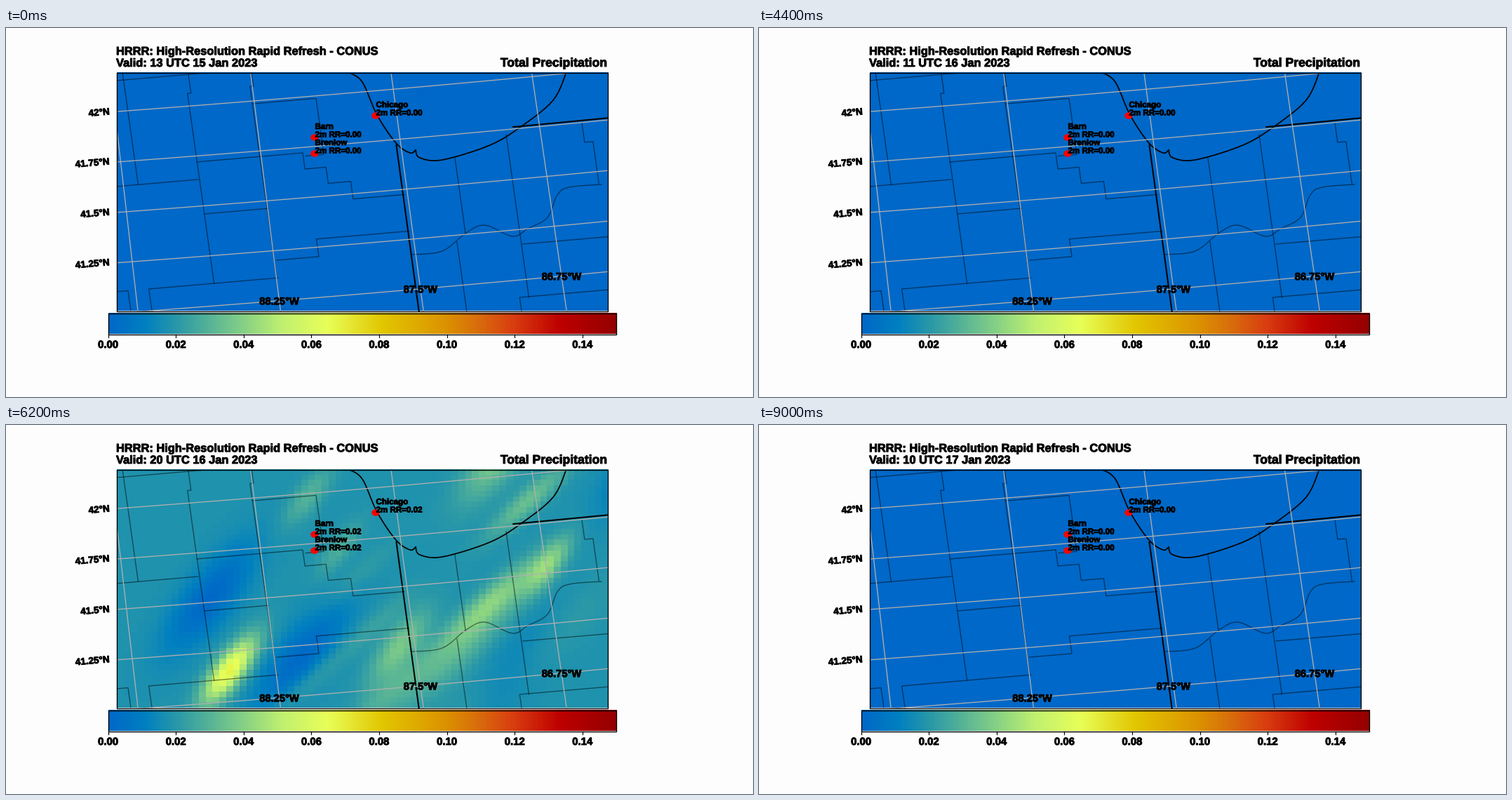
Recreate the animation shown at these times as a matplotlib script. Size 1065 px wide and 526 px high, loop 9200 ms.

```python
import matplotlib.pyplot as plt
import numpy as np
from matplotlib import patheffects
from matplotlib.animation import FuncAnimation
from matplotlib.colors import LinearSegmentedColormap
from matplotlib.patches import Ellipse, Rectangle

W, H, DPI = 1065, 526, 64
PT = 72 / DPI  # points per pixel
FRAMES, INTERVAL = 46, 200
LEFT, TOP, RIGHT, BOTTOM = 157.5, 63.5, 858, 403.5
COLS, ROWS = 72, 44
VMAX = 0.15

plt.rcParams["font.family"] = "Liberation Sans"
fig = plt.figure(figsize=(W / DPI, H / DPI), dpi=DPI, facecolor="#fdfdfd")
ax = fig.add_axes([0, 0, 1, 1])
ax.set_axis_off()

rain_cmap = LinearSegmentedColormap.from_list("rain", [
    (0.00, "#0068c8"), (0.07, "#0080c0"), (0.133, "#2a98a8"),
    (0.267, "#88d284"), (0.34, "#c0f070"), (0.43, "#e8ff58"),
    (0.54, "#e2c600"), (0.66, "#dc9400"), (0.73, "#d86c0c"),
    (0.80, "#d83c10"), (0.89, "#be0000"), (1.00, "#960000")])


# Map projection: Lambert conformal conic on one standard parallel.
STANDARD_LAT, CENTRAL_LON = 38.5, -97.5
SCALE_X, SCALE_Y = 20465, 16379  # pixels per radian
ANCHOR_GEO, ANCHOR_PIXEL = (-87.5, 41.5), (571.5, 229.6)


def lambert(lon, lat):
    phi0, lat = np.radians(STANDARD_LAT), np.radians(lat)
    n = np.sin(phi0)
    ratio = np.tan(np.pi / 4 + phi0 / 2) / np.tan(np.pi / 4 + lat / 2)
    rho = ratio ** n / np.tan(phi0)
    theta = n * np.radians(lon - CENTRAL_LON)
    return rho * np.sin(theta), rho * np.cos(theta)


def project(lon, lat):
    x, y = lambert(lon, lat)
    x0, y0 = lambert(*ANCHOR_GEO)
    return (ANCHOR_PIXEL[0] + SCALE_X * (x - x0),
            ANCHOR_PIXEL[1] + SCALE_Y * (y - y0))


def survey(x, y, *moves):
    """Border along the land grid: moves go south and east by turns."""
    points = [(x, y)]
    for i, d in enumerate(moves):
        x, y = (x + d, y - .086 * d) if i % 2 else (x + .14 * d, y + d)
        points.append((x, y))
    return points


def smooth(points, steps=8):
    """Catmull-Rom curve through a few points."""
    p = np.array([points[0], *points, points[-1]], float)
    t = np.linspace(0, 1, steps)[:, None]
    return np.vstack([
        b + .5 * t * (c - a + t * (2 * a - 5 * b + 4 * c - d
                                   + t * (3 * (b - c) + d - a)))
        for a, b, c, d in zip(p, p[1:], p[2:], p[3:])])


frame_box = Rectangle((LEFT, TOP), RIGHT - LEFT, BOTTOM - TOP, fill=False,
                      ec="black", lw=1.4 * PT, zorder=6)
ax.add_patch(frame_box)


def line(points, width, color="black", alpha=1, zorder=3):
    artist, = ax.plot(*np.transpose(points), color=color, lw=width * PT,
                      alpha=alpha, zorder=zorder)
    artist.set_clip_path(frame_box)


def label(x, y, text, size, ha="left", va="baseline", **kw):
    heavy = patheffects.withStroke(linewidth=.9 * PT, foreground="black")
    return ax.text(x, y, text, fontsize=size * PT, weight="bold", ha=ha,
                   va=va, zorder=8, path_effects=[heavy], **kw)


counties = [
    survey(166, 63, 160),
    survey(157, 75, 0, 190),
    survey(157, 226, 0, 117),
    survey(260, 66, 27, -5, 271),
    survey(272, 191, 0, 151, 23, 30, 23, 32, 25, 73),
    survey(283, 265, 0, 91),
    survey(208, 403, -31, 184),
    survey(157, 376, 0, 17, 28),
    survey(350, 63, 20, -5, 270),
    survey(352, 108, 0, 90, 80, -26),
    survey(386, 331, 0, 60, -25, 132),
    survey(640, 185, 109),
    survey(643, 305, 98),
    survey(713, 152, 232),
    survey(737, 308, 0, 121),
    survey(735, 403, -19, 126),
    survey(821, 135, 28, 12, 60),
]
river = smooth([(578, 323), (622, 318), (656, 292), (683, 281), (722, 297),
                (744, 286), (772, 270), (786, 238), (803, 227), (849, 223)])
shore_west = smooth([(488, 63), (508, 77), (529, 124), (556, 164),
                     (576, 178), (584, 174)])
shore_east = smooth([(584, 174), (590, 185), (622, 188), (690, 167),
                     (735, 140), (780, 103), (799, 63)])

for border in [*counties, river]:
    line(border, 1.3, alpha=.5)
for shore in (shore_west, shore_east):
    line(shore, 1.7)

lats, lons = np.linspace(40.8, 42.5, 60), np.linspace(-89.5, -86, 60)
line(np.transpose(project(-87.524, lats[lats < 41.74])), 2)
line(np.transpose(project(lons[lons > -86.9], 41.76)), 2)

for lon in np.arange(-89, -86.5, .75):
    line(np.transpose(project(lon, lats)), 1.3, "#b0b0b0", zorder=4)
    if lon > -89:
        label(*project(lon, 41), f"{-lon:g}°W", 14.7, "center",
              "center_baseline")
for lat in np.arange(41, 42.3, .25):
    xs, ys = project(lons, lat)
    line(np.column_stack([xs, ys]), 1.3, "#b0b0b0", zorder=4)
    if 41 < lat < 42.25:
        label(148.5, np.interp(LEFT, xs, ys) + 1.5, f"{lat:g}°N", 13.5,
              "right", "center", rotation=5)

label(157, 38.2, "HRRR: High-Resolution Rapid Refresh - CONUS", 16.4)
label(858, 55, "Total Precipitation", 17.6, "right")
valid_text = label(157, 55, "", 16.4)

# Colour scale
BAR_LEFT, BAR_RIGHT, BAR_TOP, BAR_BOTTOM = 145.5, 870, 407, 436.5
ax.imshow(np.linspace(0, 1, 256)[None], cmap=rain_cmap, aspect="auto",
          extent=(BAR_LEFT, BAR_RIGHT, BAR_BOTTOM, BAR_TOP), zorder=1)
ax.add_patch(Rectangle((BAR_LEFT, BAR_TOP), BAR_RIGHT - BAR_LEFT,
                       BAR_BOTTOM - BAR_TOP, fill=False, ec="black",
                       lw=1.4 * PT, zorder=6))
for value in np.arange(0, VMAX, .02):
    x = BAR_LEFT + (BAR_RIGHT - BAR_LEFT) * value / VMAX
    ax.plot([x, x], [BAR_BOTTOM, BAR_BOTTOM + 4.5], color="black", lw=1.2 * PT)
    label(x, 456, f"{value:.2f}", 14.9, "center")


# Rain: each stage is a level background plus streaks of one tilt and shape.
cell_w, cell_h = (RIGHT - LEFT) / COLS, (BOTTOM - TOP) / ROWS
gx, gy = np.meshgrid(LEFT + cell_w * (np.arange(COLS) + .5),
                     TOP + cell_h * (np.arange(ROWS) + .5))


class Stage:
    def __init__(self, hour, base, tilt, aspect, drift, streaks):
        self.hour, self.base, self.aspect, self.drift = hour, base, aspect, drift
        self.cos, self.sin = np.cos(np.radians(tilt)), np.sin(np.radians(tilt))
        self.streaks = streaks  # x, y, half length, strength

    def at(self, hour):
        field = np.full_like(gx, self.base)
        hours = hour - self.hour
        for x, y, length, strength in self.streaks:
            dx = gx - x - self.drift[0] * hours
            dy = gy - y - self.drift[1] * hours
            along = (dx * self.cos - dy * self.sin) / length
            across = (dx * self.sin + dy * self.cos) / (length * self.aspect)
            field += strength * np.exp(-along ** 2 - across ** 2)
        return field


stages = [
    Stage(25, .060, 86, .38, (45, -8), [
        (303, 205, 68, .045), (215, 252, 75, .024), (158, 335, 80, .036),
        (200, 64, 26, .050), (190, 125, 70, -.032), (240, 110, 50, -.016)]),
    Stage(29, .027, 52, .36, (40, -14), [
        (625, 68, 80, .032), (350, 130, 50, .018), (395, 205, 45, .015),
        (690, 230, 48, .034), (238, 378, 55, .078), (480, 345, 62, .030),
        (210, 275, 90, -.027), (340, 360, 95, -.026),
        (640, 375, 100, -.017), (820, 85, 80, -.017)]),
    Stage(34, .001, 42, .22, (38, -10), [
        (805, 222, 88, .055), (858, 78, 75, .045), (755, 295, 125, .035),
        (655, 355, 90, .022), (835, 320, 150, .022), (640, 255, 70, .016),
        (540, 340, 75, .022), (610, 190, 75, .013)]),
    Stage(38, .001, 54, .24, (38, -16), [
        (325, 102, 86, .140), (240, 75, 42, .068), (395, 95, 85, .026),
        (350, 225, 85, .058), (382, 328, 48, .135), (412, 356, 32, .080),
        (420, 256, 45, .072), (490, 252, 100, .028), (505, 312, 50, .022),
        (562, 155, 65, .020)]),
]
FADE_HOURS = 6


def sigmoid(z):
    return 1 / (1 + np.exp(-np.clip(z, -50, 50)))


def rain(hour):
    first, second, last = stages[0], stages[1], stages[-1]
    if hour <= first.hour:
        field = first.at(hour)
    elif hour >= last.hour:
        field = last.at(hour) * max(0, 1 - (hour - last.hour) / FADE_HOURS)
    else:
        a, b = next((a, b) for a, b in zip(stages, stages[1:])
                    if hour <= b.hour)
        t = (hour - a.hour) / (b.hour - a.hour)
        t = t * t * (3 - 2 * t)
        field = (1 - t) * a.at(hour) + t * b.at(hour)
    if hour < second.hour:
        # The leading edge sweeps east, with a weak fringe ahead of it.
        edge = 341 + .05 * (gy - 230) + 160 * (hour - first.hour)
        field *= (.85 * sigmoid((edge - gx) / 10)
                  + .15 * sigmoid((edge + 40 - gx) / 20))
    return np.clip(field, 0, VMAX)


image = ax.imshow(np.zeros((ROWS, COLS)), cmap=rain_cmap, vmin=0, vmax=VMAX,
                  extent=(LEFT, RIGHT, BOTTOM, TOP), interpolation="nearest",
                  aspect="auto", zorder=1)

readings = []
for x, y, name in [(527, 125, "Chicago"), (440, 156, "Barn"),
                   (440, 179, "Brenlow")]:
    ax.add_patch(Ellipse((x, y), 11.5, 9.5, color="red", lw=0, zorder=7))
    label(x + .5, y - 12, name, 11.6)
    row, col = int((y - TOP) / cell_h), int((x - LEFT) / cell_w)
    readings.append((label(x + .5, y - .5, "", 11.6), row, col))

ax.set_xlim(0, W)
ax.set_ylim(H, 0)


def update(hour):
    field = rain(hour)
    image.set_data(field)
    day, clock = divmod(13 + hour, 24)
    valid_text.set_text(f"Valid: {clock:02d} UTC {15 + day} Jan 2023")
    for text, row, col in readings:
        text.set_text(f"2m RR={field[row, col]:.2f}")
    return image, valid_text


animation = FuncAnimation(fig, update, frames=FRAMES, interval=INTERVAL,
                          repeat=True, repeat_delay=0)
plt.show()
```
